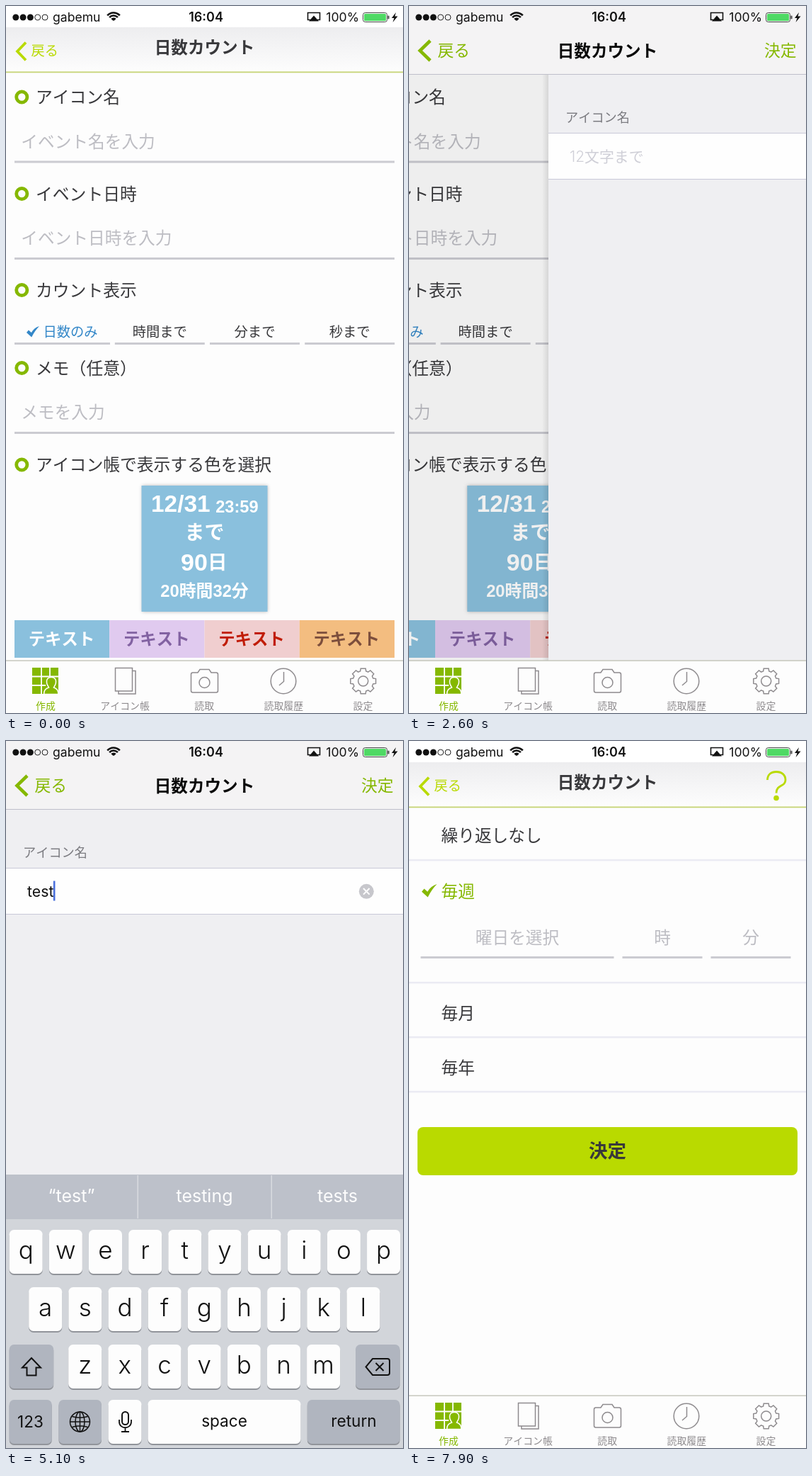
These frames come from a looping animation (561x998 px, 8000 ms). An HTML page with a canvas:

```html
<!DOCTYPE html>
<html lang="ja">
<head>
<meta charset="utf-8">
<title>日数カウント</title>
<style>
  html, body { margin: 0; width: 100%; height: 100%; overflow: hidden; background: #fdfdfd; }
  canvas { display: block; width: 100vw; height: 100vh; }
</style>
</head>
<body>
<canvas id="stage" width="561" height="998"></canvas>
<script>
const W = 561, H = 998, LOOP = 8000;
const ctx = document.getElementById('stage').getContext('2d');
const SANS = 'Inter, "Noto Sans CJK JP", "Noto Sans CJK", sans-serif';
const ARIAL = '"Liberation Sans", "Noto Sans CJK JP", "Noto Sans CJK", sans-serif';
const GREEN = '#85b800', LIME = '#b9da00', INK = '#38383b', HINT = '#bdbdc3', RULE = '#cbcbd1';

const T = { push: 2478, board: 3061, pop: 5500, dates: 6650 };
const TYPED = [[3800, 't'], [4100, 'te'], [4400, 'tes'], [4700, 'test']];
const GUESSES = [
  ['“I”', 'the', 'I’m'], ['“t”', 'the', 'to'], ['“te”', 'ten', 'tell'],
  ['“tes”', 'test', 'tests'], ['“test”', 'testing', 'tests']
];

const clamp = v => Math.max(0, Math.min(1, v));

// Part of the way still to go for a critically damped slide
function left(t, start) {
  const k = (t - start) * 0.018;
  return k <= 0 ? 1 : k > 9 ? 0 : (1 + k) * Math.exp(-k);
}

function box(x, y, w, h, color) {
  ctx.fillStyle = color;
  ctx.fillRect(x, y, w, h);
}

function round(x, y, w, h, r, color) {
  ctx.fillStyle = color;
  ctx.beginPath();
  ctx.roundRect(x, y, w, h, r);
  ctx.fill();
}

function disc(x, y, r, color) {
  ctx.fillStyle = color;
  ctx.beginPath();
  ctx.arc(x, y, r, 0, 7);
  ctx.fill();
}

function circle(x, y, r, color, width) {
  ctx.strokeStyle = color;
  ctx.lineWidth = width;
  ctx.beginPath();
  ctx.arc(x, y, r, 0, 7);
  ctx.stroke();
}

function path(d, color, width, x = 0, y = 0) {
  ctx.save();
  ctx.translate(x, y);
  if (width) {
    ctx.strokeStyle = color;
    ctx.lineWidth = width;
    ctx.stroke(new Path2D(d));
  } else {
    ctx.fillStyle = color;
    ctx.fill(new Path2D(d));
  }
  ctx.restore();
}

// y is the middle of the capitals and kanji
function text(s, x, y, size, color, align = 'left', weight = 400, family = SANS) {
  ctx.font = `${weight} ${size}px ${family}`;
  ctx.textAlign = align;
  ctx.fillStyle = color;
  ctx.fillText(s, x, y + size * 0.37);
}

function tick(x, y, color, s) {
  path(`M0 ${s * .5}L${s * .16} ${s * .3}L${s * .38} ${s * .5}Q${s * .6} ${s * .12} ${s} 0Q${s * .65} ${s * .35} ${s * .4} ${s * .86}Z`, color, 0, x, y);
}

function statusBar() {
  for (let i = 0; i < 5; i++) {
    const x = 13.8 + i * 10.3;
    if (i < 3) disc(x, 16, 4.5, '#111');
    else circle(x, 16, 4, '#222', 1);
  }
  text('gabemu', 66, 15.5, 17.6, '#111');
  for (const r of [3, 8, 12]) {
    ctx.strokeStyle = '#111';
    ctx.lineWidth = r === 3 ? 4 : 2.6;
    ctx.beginPath();
    ctx.arc(152, 21.5, r, -Math.PI * .76, -Math.PI * .24);
    ctx.stroke();
  }
  text('16:04', 282.5, 15.5, 18, '#111', 'center', 600);
  path('M430 19.5H426.5V9.5H443.5V19.5H440', '#111', 1.6);
  path('M435 13.5L442 21.5H428Z', '#111');
  text('100%', 499, 15.5, 17.6, '#111', 'right');
  ctx.strokeStyle = '#444';
  ctx.lineWidth = 1;
  ctx.beginPath();
  ctx.roundRect(504.5, 9.5, 34, 13, 3);
  ctx.stroke();
  round(506, 11, 31, 10, 1.5, '#4fd964');
  round(539.5, 13.5, 2, 5, 1, '#444');
  path('M551 9L545 17H548.5L546.5 23L553.5 14.5H549.5Z', '#111');
}

function webNav(help) {
  box(0, 0, W, 30, '#fff');
  const g = ctx.createLinearGradient(0, 30, 0, 93);
  g.addColorStop(0, '#ededef');
  g.addColorStop(1, '#fdfdfd');
  box(0, 30, W, 63, g);
  box(0, 92.5, W, 1.8, '#c6d474');
  path('M28 51.5L16 64L28 76.5', LIME, 3.8);
  text('戻る', 35.5, 62.5, 19.2, LIME, 'left', 350);
  text('日数カウント', 280.5, 58, 23.6, INK, 'center', 700);
  if (help) {
    path('M506.5 55C506.5 47 512 43.5 519 43.5C527 43.5 532 48 532 55C532 65 519 61 519 73.5', LIME, 2.8);
    disc(519, 80.5, 3.8, LIME);
  }
}

function nativeNav() {
  box(0, 0, W, 96, '#f4f3f4');
  box(0, 96, W, 1, '#bfbfca');
  path('M30 49L15.5 63L30 77', GREEN, 4.6);
  text('戻る', 40.5, 63, 22.8, GREEN, 'left', 350);
  text('日数カウント', 280.5, 63, 23.6, '#0a0a0a', 'center', 700);
  text('決定', 547.5, 63, 22.8, GREEN, 'right', 350);
}

function heading(s, y) {
  circle(22.3, y, 7.6, GREEN, 4.8);
  text(s, 42, y, 23.8, INK, 'left', 350);
}

function field(hint, y) {
  text(hint, 21.3, y, 23.7, HINT, 'left', 350);
  box(12, y + 27.5, 537, 3, RULE);
}

function form(name) {
  box(0, 94, W, 830, '#fdfdfd');
  heading('アイコン名', 128.5);
  ctx.save();
  if (name) {
    text(name, 21.5, 187, 21.8, INK);
    box(12, 211, 537, 3, RULE);
    ctx.translate(0, -7.5);
  } else {
    field('イベント名を入力', 191);
  }
  heading('イベント日時', 265);
  field('イベント日時を入力', 327.5);
  heading('カウント表示', 401);
  ['日数のみ', '時間まで', '分まで', '秒まで'].forEach((s, i) => {
    const x = i ? 19.6 + i * 134.2 : 12;
    if (i) text(s, x + 63.5, 460, 19.3, INK, 'center', 350);
    else text(s, 52.5, 460, 19.3, '#3387c8', 'left', 350);
    box(x, 475, i ? 127 : 135, 3, RULE);
  });
  tick(29, 452, '#3387c8', 18);
  heading('メモ（任意）', 511);
  field('メモを入力', 573.5);
  heading('アイコン帳で表示する色を選択', 647.5);

  ctx.shadowColor = 'rgba(0,0,0,.28)';
  ctx.shadowBlur = 5;
  box(191.5, 677, 178, 178, '#8ac0dd');
  ctx.shadowColor = 'transparent';
  text('12/31', 205, 702, 33.4, '#fff', 'left', 700, ARIAL);
  text('23:59', 356.5, 706, 23.6, '#fff', 'right', 700, ARIAL);
  text('まで', 280.5, 742.5, 28, '#fff', 'center', 700, ARIAL);
  text('90', 247, 784, 34, '#fff', 'left', 700, ARIAL);
  text('日', 285, 785, 27.5, '#fff', 'left', 700, ARIAL);
  text('20時間32分', 280.5, 825.5, 23.8, '#fff', 'center', 700, ARIAL);
  [['#8ac0dd', '#fff'], ['#e0caef', '#8262a2'], ['#f0cecf', '#c01c06'], ['#f3bd80', '#7c4e3c']]
    .forEach(([back, ink], i) => {
      box(12 + i * 134.25, 867, 134.25, 53, back);
      text('テキスト', 78.5 + i * 134.25, 893, 23.4, ink, 'center', 700);
    });
  ctx.restore();
}

function editor(value, typing) {
  box(0, 97, W, 827, '#efeff2');
  text('アイコン名', 24, 157, 18.2, '#7b7b80', 'left', 350);
  box(0, 179, W, 66, '#c9c9d8');
  box(0, 180, W, 64, '#fefefe');
  if (value) {
    text(value, 30, 212, 21.3, '#111');
    const w = ctx.measureText(value).width;
    box(30 + w - .5, 197.5, 2.6, 28, '#4a70dc');
    disc(509.3, 212.3, 10.5, '#c7c7cc');
    path('M505 208L513.6 216.6M513.6 208L505 216.6', '#fff', 2);
  } else {
    text('12文字まで', 30, 212, 20.9, '#cfcfd7', 'left', 350);
    if (typing) box(29.8, 197, 3, 29, '#4a70dc');
  }
}

function dates() {
  box(0, 94, W, 830, '#fdfdfd');
  for (const y of [168, 341, 418, 495]) box(0, y - 1.2, W, 2.6, '#ebebf3');
  text('繰り返しなし', 45.5, 133, 23.7, INK, 'left', 350);
  text('毎週', 45.5, 212.5, 23.7, GREEN, 'left', 350);
  text('毎月', 45.5, 384, 23.7, INK, 'left', 350);
  text('毎年', 45.5, 461, 23.7, INK, 'left', 350);
  tick(18, 202, GREEN, 21.5);
  for (const [s, x, w] of [['曜日を選択', 16.5, 273], ['時', 301.5, 113], ['分', 426.5, 113]]) {
    text(s, x + w / 2, 277, 23.7, HINT, 'center', 350);
    box(x, 304, w, 3, RULE);
  }
  round(12, 545, 537, 68, 8, LIME);
  text('決定', 280.5, 578.5, 26.5, INK, 'center', 700);
}

function gear(x, y) {
  ctx.beginPath();
  for (let i = 0; i < 8; i++) {
    for (const [turn, r] of [[-.28, 14.6], [-.19, 18.2], [.19, 18.2], [.28, 14.6]]) {
      const a = i * Math.PI / 4 + turn;
      ctx.lineTo(x + r * Math.cos(a), y + r * Math.sin(a));
    }
  }
  ctx.closePath();
  ctx.stroke();
}

function tabBar() {
  box(0, 924, W, 74, '#fdfdfd');
  box(0, 923.5, W, 1.2, '#babbae');
  const ink = '#8e8b8e';
  box(37, 934, 37, 37, GREEN);
  path('M50 934V971M37 946.5H50M62 934V946.5H74M50 946.5H62M37 959H56', '#fff', 1.8);
  path('M53.5 971.5C53.5 965 57 963 60.5 962C54 952 59 947.5 64 947.5C69 947.5 74 952 67.5 962C71 963 74 965 74 971.5Z', '#fff', 1.5);
  path('M158.5 967H154.5V934.5H178.5V967H158.5M178.5 938.5H183V971H159V967', ink, 1.5);
  path('M264 941H271L274 936.5H287L290 941H297Q299.5 941 299.5 943.5V966.5Q299.5 969 297 969H264Q261.5 969 261.5 966.5V943.5Q261.5 941 264 941Z', ink, 1.5);
  circle(280.5, 955, 7.5, ink, 1.5);
  circle(392, 953, 17.8, ink, 1.5);
  path('M392.5 940V953.5L386 959', ink, 1.5);
  circle(504.7, 953, 7, ink, 1.5);
  gear(504.7, 953);
  ['作成', 'アイコン帳', '読取', '読取履歴', '設定'].forEach((s, i) =>
    text(s, 56 + i * 112.1, 987.5, 13.9, i ? ink : GREEN, 'center', 350));
}

function key(x, y, w, dark) {
  round(x, y + 2, w, 62, 6.5, '#91949a');
  round(x, y, w, 62, 6.5, dark ? '#b0b5bf' : '#fdfdfd');
}

function letters(s, x, y) {
  [...s].forEach((c, i) => {
    const kx = x + i * 56.15;
    key(kx, y, 47);
    ctx.font = `360 35px ${SANS}`;
    ctx.textAlign = 'center';
    ctx.fillStyle = '#111';
    ctx.fillText(c, kx + 23.5, y + 41);
  });
}

function keyboard(x, y, t, count) {
  ctx.save();
  ctx.translate(x, y);
  box(0, 0, W, 386, '#d2d5da');
  box(0, 0, W, 63, '#bdc1ca');
  box(185.5, 1, 1.5, 61, '#d9dbe0');
  box(374.5, 1, 1.5, 61, '#d9dbe0');
  GUESSES[count].forEach((s, i) => {
    ctx.globalAlpha = count || i === 1 ? 1 : clamp((t - 3280 + i * 40) / 200);
    text(s, 92.5 + i * 188, 29.5, 25, '#fdfdfd', 'center');
  });
  ctx.globalAlpha = 1;
  letters('qwertyuiop', 4.7, 78);
  letters('asdfghjkl', 32.2, 159);
  letters('zxcvbnm', 88.2, 240);

  key(4.7, 240, 62.5, true);
  path('M36 259L49 272.5H42.5V283.5H29.5V272.5H23Z', '#111', 2);
  key(494, 240, 62.5, true);
  path('M518 260H539Q542 260 542 263V280Q542 283 539 283H518L508.5 271.5Z', '#111', 2);
  path('M522.5 266L533.5 277M533.5 266L522.5 277', '#111', 2);

  key(4.7, 318, 60, true);
  text('123', 34.5, 349, 22.5, '#111', 'center');
  key(74.5, 318, 60.5, true);
  circle(104.5, 349, 14, '#111', 1.5);
  ctx.beginPath();
  ctx.ellipse(104.5, 349, 6.5, 14, 0, 0, 7);
  ctx.stroke();
  path('M104.5 335V363M90.5 349H118.5M93.5 341.5Q104.5 345 115.5 341.5M93.5 356.5Q104.5 353 115.5 356.5', '#111', 1.4);
  key(144.5, 318, 47);
  ctx.strokeStyle = '#111';
  ctx.lineWidth = 2;
  ctx.beginPath();
  ctx.roundRect(164, 335, 9, 18, 4.5);
  ctx.stroke();
  path('M160 346V349C160 360 177 360 177 349V346M168.5 357V363M163 363H174', '#111', 1.8);
  key(200.5, 318, 216);
  text('space', 308.5, 348, 22.6, '#111', 'center');
  key(425.8, 318, 130.7, true);
  text('return', 491.5, 348, 22.6, '#111', 'center');
  ctx.restore();
}

// Top page sits x to the right; the page below lags at 30 % and dims
function stack(x, below, above) {
  const shown = 1 - x / W;
  if (x > 0) {
    ctx.save();
    ctx.translate(-shown * W * .3, 0);
    below();
    ctx.restore();
    box(0, 94, W, 830, `rgba(0,0,0,${.09 * shown})`);
  }
  if (x >= W) return;
  ctx.save();
  ctx.translate(x, 0);
  if (x > 0) {
    const g = ctx.createLinearGradient(-9, 0, 0, 0);
    g.addColorStop(0, 'rgba(0,0,0,0)');
    g.addColorStop(1, 'rgba(0,0,0,.1)');
    box(-9, 94, 9, 830, g);
  }
  above();
  ctx.restore();
}

function draw(t) {
  const count = TYPED.filter(([at]) => t >= at).length;
  const value = count ? TYPED[count - 1][1] : '';
  const popped = t >= T.pop;
  const editing = t >= T.push && !popped;
  const slide = popped ? W * (1 - left(t, T.pop)) : W * left(t, T.push);

  if (t < T.dates) {
    stack(slide, () => form(popped ? value : ''), () => editor(value, t >= T.board));
  } else {
    stack(W * left(t, T.dates), () => form(value), dates);
  }
  tabBar();
  if (t >= T.board && slide < W) {
    keyboard(popped ? slide : 0, 612 + 386 * left(t, T.board), t, count);
  }
  if (editing) nativeNav();
  else webNav(t >= T.dates);
  statusBar();
}

function play(now) {
  draw(now % LOOP);
  requestAnimationFrame(play);
}
requestAnimationFrame(play);
</script>
</body>
</html>
```
